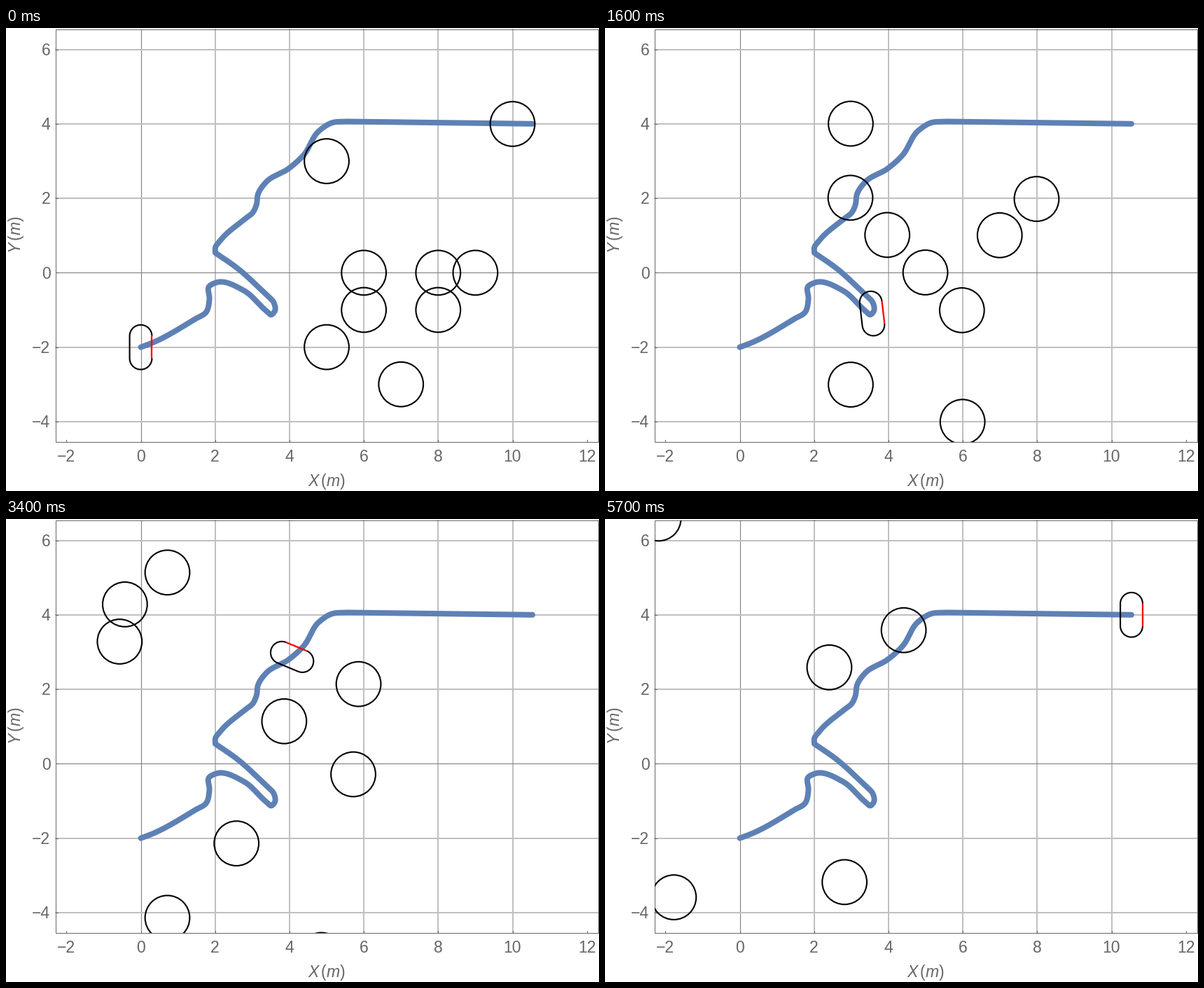
A matplotlib script for the animation above (5.8 s loop, 847 by 661 pixels).

```python
import numpy as np
import matplotlib.pyplot as plt
from matplotlib.animation import FuncAnimation
from matplotlib.patches import Circle, Rectangle

plt.rcParams.update({
    "font.family": "Liberation Sans",
    "mathtext.fontset": "custom",
    "mathtext.rm": "Liberation Sans",
    "mathtext.it": "Liberation Sans:italic",
})

W, H, DPI = 847, 661, 64
FRAMES, INTERVAL = 58, 100
PT = 72 / DPI                        # points per pixel
UNIT, X0, Y0 = 53.1, 192.5, 349.4    # pixels per metre and plot origin
LEFT, TOP, RIGHT, BOTTOM = 70.5, 1.5, 845.5, 591
GRAY = "#666666"


def px(x):
    return X0 + UNIT * x


def py(y):
    return Y0 - UNIT * y


fig = plt.figure(figsize=(W / DPI, H / DPI), dpi=DPI, facecolor="white")
ax = fig.add_axes([0, 0, 1, 1])
ax.set(xlim=(0, W), ylim=(H, 0))
ax.axis("off")


def line(xs, ys, color, width, **kw):
    return ax.plot(xs, ys, color=color, lw=width * PT, **kw)[0]


def label(x, y, text, **kw):
    ax.text(x, y, text, color=GRAY, fontsize=23 * PT, **kw)


def number(n):
    return str(n).replace("-", "\u2212")


def grid_style(n):
    return ("#858585", 1.2) if n == 0 else ("#c0c0c0", 2)


# Grid, ticks and labels
for n in range(-2, 13, 2):
    x = px(n)
    if 0 <= n < 12:
        line([x, x], [TOP, BOTTOM], *grid_style(n), zorder=1)
    line([x, x], [BOTTOM - 3, BOTTOM], GRAY, 1, zorder=1)
    label(x, 619.3, number(n), ha="center", va="baseline")
for n in range(-4, 7, 2):
    y = py(n)
    line([LEFT, RIGHT], [y, y], *grid_style(n), zorder=1)
    line([LEFT, LEFT + 3], [y, y], GRAY, 1, zorder=1)
    label(63.5, y + 8.2, number(n), ha="right", va="baseline")
label(458, 647.5, r"$X\,(m)$", ha="center", va="center")
label(14.5, 295.5, r"$Y\,(m)$", ha="center", va="center", rotation=90)

frame = Rectangle((LEFT, TOP), RIGHT - LEFT, BOTTOM - TOP,
                  fill=False, ec=GRAY, lw=PT, zorder=2)
ax.add_patch(frame)


def smooth(pts, per=24):
    """Cubic curve through the points, spaced by chord length."""
    pts = np.array(pts, float)
    t = np.r_[0, np.cumsum(np.hypot(*np.diff(pts, axis=0).T))]
    tangent = np.gradient(pts, t, axis=0)
    u = np.linspace(0, 1, per)[:, None]
    h = np.diff(t)
    return np.vstack([
        (1 + 2 * u) * (1 - u) ** 2 * pts[i]
        + u * (1 - u) ** 2 * h[i] * tangent[i]
        + u * u * (3 - 2 * u) * pts[i + 1]
        + u * u * (u - 1) * h[i] * tangent[i + 1]
        for i in range(len(h))])


# Route: way out with a hook, way back to a sharp corner, climb, straight run
HOOK, CORNER = (374, 382.5), (299, 321)
OUT = [(192.5, 455.7), (204, 451.5), (270, 415.5), (286, 405.5), (290.5, 387),
       (290, 369), (300, 363.5), (340, 375), (372, 404), (379, 409.3),
       (384, 404), (382.5, 392), HOOK]
BACK = [HOOK, (329, 341.8), CORNER]
CLIMB = [CORNER, (299, 313.5), (306, 303.5), (342, 272), (352.5, 263.5),
         (357.5, 253), (360, 237), (372, 219.5), (404, 200.5), (425, 181.5),
         (447, 147), (465, 135.5), (488, 133.5)]
route = np.vstack([smooth(OUT), smooth(BACK), smooth(CLIMB), (752, 136.8)])
arc = np.r_[0, np.cumsum(np.hypot(*np.diff(route, axis=0).T))]
line(*route.T, "#5e81b5", 8, zorder=3,
     solid_capstyle="round", solid_joinstyle="round")

# Obstacles: start x, y and velocity in steps
STEP = 0.063
OBSTACLES = [
    (5, 3, -2, 1), (10, 4, -2, -2), (6, 0, -3, 2),
    (8, 0, -1, 1), (9, 0, -3, -1), (6, -1, -1, 1),
    (8, -1, -4, 2), (5, -2, -2, -1), (7, -3, -1, -1)]
circles = []
for _ in OBSTACLES:
    c = Circle((0, 0), 0.6 * UNIT, fill=False, ec="black", lw=2.1 * PT, zorder=4)
    ax.add_patch(c)
    c.set_clip_path(frame)
    circles.append(c)

# Robot: capsule with a red front edge
R = 0.3 * UNIT
a = np.linspace(0, np.pi, 30)
cap = np.c_[R * np.cos(a), R + R * np.sin(a)]
HULL = np.vstack([cap, -cap])
FRONT = np.array([(R, R), (R, -R)])
hull = line([], [], "black", 2.1, zorder=5, solid_capstyle="butt")
front = line([], [], "red", 2.3, zorder=5, solid_capstyle="butt")

# Steady speed with a soft start and a short braking phase;
# the heading swings back and forth at an even rate.
LAG, BRAKE, LOST = 0.8, 3, 12
LAST = FRAMES - 1
SPEED = (arc[-1] + LOST) / (LAST - LAG)
TURN_AT = [0, 3, 6.7, 9.3, 15.2, 28.3, 40.7]
TURN = [0, 28, 28, 53, -1, 125, 0]


def travelled(i):
    s = SPEED * (i - LAG * (1 - np.exp(-i / LAG)))
    return s - LOST * (max(i - LAST + BRAKE, 0) / BRAKE) ** 2


def place(artist, shape, x, y, angle):
    c, s = np.cos(angle), np.sin(angle)
    fx, fy = shape.T
    artist.set_data(x + fx * c - fy * s, y - fx * s - fy * c)


def draw(i):
    for c, (x, y, vx, vy) in zip(circles, OBSTACLES):
        c.center = px(x + vx * STEP * i), py(y + vy * STEP * i)
    x, y = (np.interp(travelled(i), arc, p) for p in route.T)
    angle = np.radians(np.interp(i, TURN_AT, TURN))
    place(hull, HULL, x, y, angle)
    place(front, FRONT, x, y, angle)
    return [*circles, hull, front]


anim = FuncAnimation(fig, draw, frames=FRAMES, interval=INTERVAL,
                     repeat=True, repeat_delay=0, blit=False)
plt.show()
```
